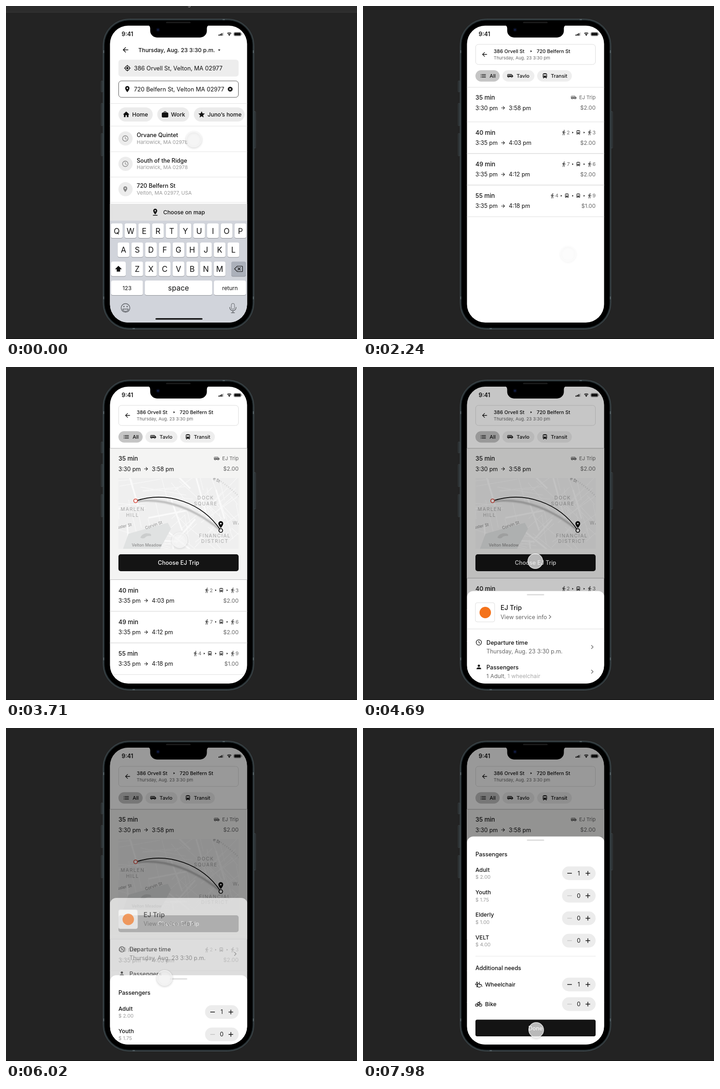
These frames come from a looping animation (768 by 729 pixels, 8000 ms). An HTML page with a canvas:

```html
<!DOCTYPE html>
<html lang="en">
<head>
<meta charset="utf-8">
<title>Trip booking</title>
<style>
html, body { margin: 0; width: 100%; height: 100%; overflow: hidden; background: #232323; }
canvas { display: block; width: 768px; height: 729px; }
</style>
</head>
<body>
<canvas id="stage" width="768" height="729"></canvas>
<script>
const ctx = document.getElementById('stage').getContext('2d');
const LOOP = 8000, INK = '#111', GREY = '#666', PALE = '#999';
const FROM = '386 Orvell St', TO = '720 Belfern St', SERVICE = 'EJ Trip';

const icons = {
  home: 'M10 20v-6h4v6h5v-8h3L12 3 2 12h3v8z',
  pin: 'M12 2C8.1 2 5 5.1 5 9c0 5.3 7 13 7 13s7-7.7 7-13c0-3.9-3.1-7-7-7zm-2.5 7a2.5 2.5 0 1 0 5 0a2.5 2.5 0 1 0-5 0z',
  star: 'M12 17.3L18.2 21l-1.7-7L22 9.2l-7.2-.6L12 2 9.2 8.6 2 9.2 7.5 14 5.8 21z',
  back: 'M20 11H7.8l5.6-5.6L12 4l-8 8 8 8 1.4-1.4L7.8 13H20z',
  next: 'M4 11h12.2l-5.6-5.6L12 4l8 8-8 8-1.4-1.4 5.6-5.6H4z',
  person: 'M8 8a4 4 0 1 0 8 0a4 4 0 1 0-8 0zM12 14c-2.7 0-8 1.3-8 4v2h16v-2c0-2.7-5.3-4-8-4z',
  bag: 'M20 6h-4V4l-2-2h-4L8 4v2H4L2 8v11l2 2h16l2-2V8zM10 4h4v2h-4z',
  bus: 'M4 16l1 2.2V21h3v-2h8v2h3v-2.8l1-2.2V6c0-3.5-3.6-4-8-4s-8 .5-8 4zM6 6h12v5H6zM6 15.5a1.5 1.5 0 1 0 3 0a1.5 1.5 0 1 0-3 0zM15 15.5a1.5 1.5 0 1 0 3 0a1.5 1.5 0 1 0-3 0z',
  van: 'M17 5H3L1 7v9h2a3 3 0 0 0 6 0h5.5a3 3 0 0 0 6 0H23v-5zM3 7h4v4H3zM9 7h4v4H9zM15 7h1l4 4h-5zM4.5 16a1.5 1.5 0 1 0 3 0a1.5 1.5 0 1 0-3 0zM16 16a1.5 1.5 0 1 0 3 0a1.5 1.5 0 1 0-3 0z',
  walk: 'M11.5 3.5a2 2 0 1 0 4 0a2 2 0 1 0-4 0zM9.8 8.9L7 23h2.1l1.8-8 2.1 2v6h2v-7.5l-2.1-2 .6-3C14.8 12 16.8 13 19 13v-2c-1.9 0-3.5-1-4.3-2.4l-1-1.6-1.7-1L6 8.3V13h2V9.6z',
  list: 'M2 6h2v2H2zM2 11h2v2H2zM2 16h2v2H2zM6 6h16v2H6zM6 11h16v2H6zM6 16h16v2H6z',
  shift: 'M12 3L2 13h5v7h10v-7h5z',
  play: 'M7 4l11 8-11 8z',
  drop: 'M5 7l7 8 7-8z'
};
for (const name in icons) icons[name] = new Path2D(icons[name]);

function text(s, x, y, size, weight = 400, color = INK, align = 'left') {
  ctx.font = `${weight} ${size}px Inter, sans-serif`;
  ctx.fillStyle = color;
  ctx.textAlign = align;
  ctx.fillText(s, x, y + size * .36);
}

function box(x, y, w, h, r, fill, line) {
  ctx.beginPath();
  ctx.roundRect(x, y, w, h, r);
  if (fill) { ctx.fillStyle = fill; ctx.fill(); }
  if (line) { ctx.strokeStyle = line; ctx.lineWidth = 1; ctx.stroke(); }
}

function disc(x, y, r, fill, line, width = 1) {
  ctx.beginPath();
  ctx.arc(x, y, r, 0, 7);
  if (fill) { ctx.fillStyle = fill; ctx.fill(); }
  if (line) { ctx.strokeStyle = line; ctx.lineWidth = width; ctx.stroke(); }
}

function stroke(d, color, width) {
  ctx.strokeStyle = color;
  ctx.lineWidth = width;
  ctx.stroke(typeof d === 'string' ? new Path2D(d) : d);
}

function layer(draw, alpha = 1, dx = 0, dy = 0) {
  ctx.save();
  ctx.globalAlpha *= alpha;
  ctx.translate(dx, dy);
  draw();
  ctx.restore();
}

function icon(name, x, y, size, color = INK) {
  layer(() => {
    ctx.scale(size / 24, size / 24);
    ctx.fillStyle = color;
    ctx.fill(icons[name], 'evenodd');
  }, 1, x - size / 2, y - size / 2);
}

const rule = (y, color = '#e3e3e3', x = 227, w = 301) => box(x, y, w, 1, 0, color);
const clamp = v => Math.min(1, Math.max(0, v));
const mix = (a, b, p) => a + (b - a) * p;
const ease = p => p * p * (3 - 2 * p);

// Underdamped spring: stiffness 100, damping 15, mass 1.
function spring(ms) {
  if (ms <= 0) return 0;
  const s = ms / 1000, k = 6.614 * s;
  return 1 - Math.exp(-7.5 * s) * (Math.cos(k) + 1.134 * Math.sin(k));
}

function clock(x, y, r, color) {
  disc(x, y, r, null, color, 1.3);
  stroke(`M${x} ${y - r * .6}V${y}l${r * .5} ${r * .35}`, color, 1.2);
}

function chip(x, y, w, h, name, label, tx, size, fill) {
  box(x, y - h / 2, w, h, h / 2, fill);
  icon(name, x + 17, y, h * .55);
  text(label, tx, y, size, 500);
}

function phone() {
  for (const [x, y, h] of [[208.5, 164, 24], [208.5, 213, 49], [208.5, 279, 49], [543, 231, 80]])
    box(x, y, 3, h, 1, '#202526', '#434b4e');
  box(212.5, 28.5, 330, 679, 57, '#2a3235', '#465257');
  box(215.5, 31.5, 324, 673, 54, '#000', '#11181a');
  for (const y of [97, 636])
    for (const x of [212, 540]) box(x, y, 3, 6, 0, '#4f5a5e');
  for (const y of [28, 705]) box(y < 99 ? 474 : 277, y, 5, 3, 0, '#4f5a5e');
}

function notch() {
  ctx.beginPath();
  ctx.moveTo(310, 42);
  ctx.lineTo(445, 42);
  ctx.quadraticCurveTo(439.500, 43, 439.500, 49);
  ctx.arcTo(439.500, 69, 420, 69, 15);
  ctx.arcTo(315.500, 69, 315.500, 52, 15);
  ctx.lineTo(315.500, 49);
  ctx.quadraticCurveTo(315.500, 43, 310, 42);
  ctx.fillStyle = '#000';
  ctx.fill();
  box(350, 34.5, 54, 3, 1.5, '#1c1c1c');
  disc(332.5, 52, 4, '#080c1d');
  disc(332.5, 52, 1.5, '#17285c');
}

function status() {
  text('9:41', 253, 61, 12.5, 600);
  for (let i = 0; i < 4; i++)
    box(465 + i * 3.1, 62.5 - i * 1.5, 2.2, 2.5 + i * 1.5, .5, i < 3 ? INK : '#ccc');
  for (const r of [6.5, 3.8]) {
    ctx.beginPath();
    ctx.arc(488.5, 65, r, -2.3, -.84);
    ctx.strokeStyle = INK;
    ctx.lineWidth = 1.7;
    ctx.stroke();
  }
  disc(488.5, 63.8, 1.4, INK);
  box(498.5, 57.5, 16, 8, 2.5, null, '#888');
  box(499.5, 58.5, 14, 6, 1.5, INK);
  box(515.5, 60, 1, 3, .5, '#888');
}

function key(x, y, w, label, size = 17, fill = '#fff') {
  box(x, y + 1, w, 32, 4, '#8d9096');
  box(x, y, w, 32, 4, fill);
  if (label) text(label, x + w / 2, y + 16.5, size, 400, INK, 'center');
}

function keyboard() {
  box(227, 433, 301, 37, 0, '#e3e3e3');
  icon('pin', 326.5, 450, 15);
  box(321.5, 457.5, 10, 1.5, 0, INK);
  text('Choose on map', 344, 452, 12.2, 500);
  box(227, 470, 301, 224, 0, '#d1d4db');
  ['QWERTYUIOP', 'ASDFGHJKL', 'ZXCVBNM'].forEach((row, r) =>
    [...row].forEach((c, i) => key([229.5, 244.3, 274.3][r] + 30.07 * i, 476 + 41.7 * r, 25.5, c)));
  key(230, 559.5, 32);
  icon('shift', 246, 575.5, 18);
  key(493, 559.5, 32, '', 0, '#abb0ba');
  stroke('M506 569.5h10.5q1 0 1 1v10q0 1-1 1H506l-6-6zM507 572.5l6 6m0-6l-6 6', INK, 1.2);
  key(230, 601, 69.5, '123', 12);
  key(304, 601, 147, 'space', 16);
  key(455, 601, 70, 'return', 12);
  disc(261.5, 661, 9.5, null, '#5c5f64', 1.4);
  disc(258, 658, 1.4, '#5c5f64');
  disc(265, 658, 1.4, '#5c5f64');
  stroke('M255.5 663.5h12a6 5 0 0 1-12 0z', '#5c5f64', 1.3);
  box(493, 651, 7, 13, 3.5, null, '#5c5f64');
  stroke('M489.5 659v1a7 7 0 0 0 14 0v-1M496.5 667v4.5m-4 0h8', '#5c5f64', 1.3);
}

function searchScreen() {
  box(227, 43, 301, 651, 0, '#fff');
  status();
  icon('back', 261.5, 96, 18);
  text('Thursday, Aug. 23 3:30 p.m.', 289.5, 97, 12.3, 500);
  icon('drop', 466.5, 97, 9);
  box(246, 117.5, 263, 37, 6, '#ededed');
  disc(265.5, 136, 4.8, null, INK, 1.4);
  disc(265.5, 136, 2.4, INK);
  stroke('M265.5 129v3m0 8v3m-7-7h3m8 0h3', INK, 1.4);
  text(FROM + ', Velton, MA 02977', 280, 136, 12.8);
  box(246.5, 164, 262, 36, 6, '#fff', '#555');
  icon('pin', 265.5, 182, 16);
  text(TO + ', Velton MA 02977', 280, 182, 12.8);
  disc(490.5, 182, 5.3, INK);
  stroke('M488.5 180l4 4m0-4l-4 4', '#fff', 1.2);
  rule(213);
  chip(246, 237.5, 75, 31, 'home', 'Home', 276, 12.3, '#ebebeb');
  chip(331, 237.5, 70, 31, 'bag', 'Work', 361, 12.3, '#ebebeb');
  chip(411, 237.5, 111, 31, 'star', 'Juno’s home', 441, 12.3, '#ebebeb');
  rule(262.5);
  [['Orvane Quintet', 'Harlowick, MA 02978'], ['South of the Ridge', 'Harlowick, MA 02978'],
   [TO, 'Velton, MA 02977, USA']].forEach(([name, place], i) => {
    const y = 290 + 55.5 * i;
    disc(261.5, y, 15.5, '#ececec');
    if (i < 2) clock(261, y, 6, '#888');
    else icon('pin', 261, y, 15, '#888');
    text(name, 286, y - 7.5, 12.5, 500);
    text(place, 286, y + 8, 11, 400, PALE);
    rule(y + 28.5);
  });
  keyboard();
  box(327, 683.5, 103, 3, 1.5, '#000');
}

let seed = 11;
const random = () => (seed = seed * 16807 % 2147483647) / 2147483647;
const lanes = new Path2D(), avenues = new Path2D();
for (let i = 0; i < 80; i++) {
  const x = 240 + 270 * random(), y = 240 + 160 * random();
  const tilt = (x < 370 ? [-.3, 1.25, .05] : [.65, -.85, 1.2])[i % 3] + random() * .25;
  const len = 12 + 42 * random(), road = i % 7 ? lanes : avenues;
  road.moveTo(x - len * Math.cos(tilt), y - len * Math.sin(tilt));
  road.lineTo(x + len * Math.cos(tilt), y + len * Math.sin(tilt));
}

function street(s, x, y, tilt) {
  layer(() => { ctx.rotate(tilt); text(s, 0, 0, 9, 400, '#8b8b8b', 'center'); }, 1, x, y);
}

function map() {
  ctx.beginPath();
  ctx.rect(246, 243, 263, 155);
  ctx.clip();
  box(246, 243, 263, 155, 0, '#efefef');
  stroke(lanes, '#f8f8f8', 1.3);
  stroke(avenues, '#fafafa', 3.5);
  ctx.fillStyle = '#e0e2e2';
  ctx.fill(new Path2D('M256 398l12-33 86-24 7 13-24 44z'));
  ctx.fillStyle = '#cbcdcd';
  ctx.fill(new Path2D('M294 373q4-8 13-9 13 0 10 6-10-1-13 4-7 3-10-1z'));
  ctx.setLineDash([2, 3]);
  stroke('M448 239q30 12 65 48', '#dadada', 3.5);
  ctx.setLineDash([]);
  ctx.letterSpacing = '1.5px';
  [['MARLEN', 277, 311], ['HILL', 277, 324], ['DOCK', 437, 286], ['SQUARE', 437, 299],
   ['FINANCIAL', 457, 369], ['DISTRICT', 457, 381], ['WA', 506, 341]]
    .forEach(([s, x, y]) => text(s, x, y, 10.5, 400, '#a6a6a6', 'center'));
  ctx.letterSpacing = '0px';
  street('uster St', 259, 348, -.22);
  street('Corvin St', 323, 346, -.34);
  street('e St', 461, 247, .5);
  text('Velton Meadow', 308, 390, 8.8, 500, '#8b8b8b', 'center');
  layer(() => {
    ctx.filter = 'blur(1.5px)';
    stroke('M286 294C350 286 415 311 470 358', '#b4b4b4', 4);
  });
  stroke('M284 293A163 163 0 0 1 470 358', '#000', 1.7);
  disc(283.5, 293, 4, '#fff', '#d84a3d', 1.7);
  disc(470, 358, 4, '#fff', '#000', 1.7);
  icon('pin', 470, 345, 18, '#000');
}

function trip(y, total, start, end, price) {
  text(total, 246, y, 13.2, 500);
  text(start, 246, y + 22.5, 12.5);
  icon('next', 306.5, y + 22.5, 12);
  text(end, 319, y + 22.5, 12.5);
  text(price, 509, y + 22.5, 12.2, 400, GREY, 'right');
}

// Legs are laid out leftwards from the row's right edge.
function legs(y, first, buses, last) {
  text(last, 509, y, 11, 400, GREY, 'right');
  icon('walk', 496, y, 13, '#444');
  let x = 484;
  for (let i = 0; i < buses; i++, x -= 25) {
    icon('play', x, y, 6);
    icon('bus', x - 13, y, 12, '#444');
  }
  icon('play', x, y, 6);
  text(first, x - 6.5, y, 11, 400, GREY, 'right');
  icon('walk', x - 19.5, y, 13, '#444');
}

function resultsScreen(open) {
  const shift = 208.5 * open, shown = clamp(open);
  box(227, 43, 301, 651, 0, '#fff');
  status();
  box(246.5, 84, 262, 44, 6, '#fff', '#dcdcdc');
  icon('back', 266, 106, 16);
  text(FROM, 286, 99, 10.8, 500);
  icon('play', 368, 99, 7);
  text(TO, 380, 99, 10.8, 500);
  text('Thursday, Aug. 23 3:30 pm', 286, 113.5, 9.6, 400, GREY);
  chip(246, 153, 53, 25, 'list', 'All', 277, 11, '#c5c5c5');
  chip(305, 153, 70, 25, 'van', 'Tavlo', 336, 11, '#eee');
  chip(381, 153, 76, 25, 'bus', 'Transit', 411, 11, '#eee');
  layer(() => box(227, 178, 301, 75.5 + shift, 0, '#f4f4f3'), shown);
  layer(() => {
    ctx.beginPath();
    ctx.rect(227, 178, 301, 75.5 + shift);
    ctx.clip();
    layer(map);
    box(246, 410, 263, 37, 5, '#141414');
    text('Choose ' + SERVICE, 377.5, 428.5, 12.5, 500, '#fff', 'center');
  }, shown);
  rule(177.5, '#dedede');
  trip(200.5, '35 min', '3:30 pm', '3:58 pm', '$2.00');
  text(SERVICE, 509, 200.5, 11, 400, GREY, 'right');
  icon('van', 461, 200.5, 13, '#555');
  [['40 min', '4:03 pm', '$2.00', 2, 1, 3], ['49 min', '4:12 pm', '$2.00', 7, 1, 6],
   ['55 min', '4:18 pm', '$1.00', 4, 2, 9]].forEach(([total, end, price, a, buses, b], i) => {
    const y = 277 + 69.2 * i + shift;
    trip(y, total, '3:35 pm', end, price);
    legs(y, a, buses, b);
    rule(y - 23.8, '#dedede');
    rule(y + 45.4, '#dedede');
  });
  layer(() => { rule(177.5, '#bdbdbd'); rule(253.2 + shift, '#bdbdbd'); }, shown);
}

function sheet(top, alpha, draw) {
  layer(() => {
    box(0, 0, 301, 720, [14, 14, 0, 0], '#fff');
    box(131, 6.5, 38, 3, 1.5, '#dedede');
    draw();
  }, alpha, 227.5, top);
}

function serviceSheet() {
  const arrow = (x, y, h) => stroke(`M${x} ${y - h}l${h} ${h}l${-h} ${h}`, GREY, 1.3);
  box(18.5, 25.5, 42, 42, 4, '#fff', '#ddd');
  disc(40, 47, 12.5, '#f4731c');
  text(SERVICE, 73.5, 36.5, 14, 500);
  text('View service info', 73.5, 56.5, 12.5, 400, GREY);
  arrow(179.5, 56.5, 4);
  rule(82.5, '#dedede', 0);
  clock(26, 112.5, 5.8, INK);
  text('Departure time', 42.5, 112.5, 12.7, 500);
  text('Thursday, Aug. 23 3:30 p.m.', 42.5, 132, 12.4, 400, GREY);
  arrow(272, 122.5, 4);
  icon('person', 26, 166, 15);
  text('Passengers', 42.5, 166.5, 12.6, 500);
  text('1 Adult', 42.5, 186, 12.3, 400, GREY);
  text(', 1 wheelchair', 42.5 + ctx.measureText('1 Adult').width, 186, 12.3, 400, '#aaa');
  arrow(272, 176.5, 4);
}

function stepper(y, count) {
  box(208, y - 15, 73.5, 30, 15, '#ececec');
  stroke(`M219.5 ${y}h10`, count ? INK : '#c4c4c4', 1.5);
  text(count, 244.5, y, 12.5, 400, INK, 'center');
  stroke(`M259.5 ${y}h10m-5-5v10`, INK, 1.5);
}

function passengerSheet() {
  text('Passengers', 18.5, 38.5, 12.5, 500);
  [['Adult', '2.00', 1], ['Youth', '1.75', 0], ['Elderly', '1.00', 0], ['VELT', '4.00', 0]]
    .forEach(([name, price, count], i) => {
      const y = 80.5 + 49.2 * i;
      text(name, 18.5, y - 7.5, 12.3, 500);
      text('$ ' + price, 18.5, y + 8.5, 10.8, 400, PALE);
      stepper(y, count);
    });
  rule(261.5, '#e6e6e6', 18.5, 263);
  text('Additional needs', 18.5, 288, 12.5, 500);
  disc(22, 319.5, 1.5, INK);
  stroke('M22 321v5m-3-4v3m3 1v4', INK, 1.8);
  stroke('M27 318v6h4l2 5M27 322a4 4 0 1 0 3 6', INK, 1.3);
  text('Wheelchair', 39.5, 324, 12.3, 500);
  disc(21.5, 369, 3, null, INK, 1.2);
  disc(29.5, 369, 3, null, INK, 1.2);
  stroke('M21.5 369l3-5h4l-3 5zM27 361.5l2.5 7.5M23 363h3M27 361.5h2', INK, 1.2);
  text('Bike', 39.5, 367, 12.3, 500);
  stepper(324, 1);
  stepper(367, 0);
  box(18.5, 401, 263, 36.5, 4, '#141414');
  text('Done', 150, 419.5, 12.5, 500, '#fff', 'center');
}

// Time, x, y, lift.
const cursorPath = [
  [0, 411, 292, .9], [650, 480, 618, .5], [1100, 480, 618, 0], [1950, 480, 618, 0],
  [2730, 381, 377, 1], [3200, 381, 377, 1], [3710, 380, 379, .6], [4300, 377, 425, 1],
  [4800, 377, 425, 1], [5740, 347, 547, 1], [7560, 347, 547, 1], [7970, 379, 661, 1], [LOOP, 379, 661, 1]
];

function cursor(t) {
  const i = cursorPath.findIndex(k => k[0] > t);
  const a = cursorPath[i - 1], b = cursorPath[i];
  const p = ease((t - a[0]) / (b[0] - a[0]));
  const [, x, y, lift] = a.map((v, j) => mix(v, b[j], p));
  const shade = 255 - 15 * lift;
  layer(() => {
    ctx.shadowColor = `rgba(0,0,0,${.5 * lift})`;
    ctx.shadowBlur = 4;
    ctx.shadowOffsetY = 1.5;
    disc(x, y, 16.3, null, `rgba(255,255,255,${.6 + .2 * lift})`, 1.4);
  });
  disc(x, y, 16.3, `rgba(${shade},${shade},${shade},${.55 + .2 * lift})`);
}

function topBar(t) {
  layer(() => {
    box(0, 0, 768, 13, 0, '#2c2c2c');
    box(0, 13, 768, 1.5, 0, '#343434');
    text('g', 401, -4.5, 12, 400, '#aaa', 'center');
  }, 1 - clamp((t - 1400) / 180));
}

function render(t) {
  box(0, 0, 768, 729, 0, '#232323');
  topBar(t);
  box(0, 728, 768, 1, 0, '#0e0e0e');
  phone();

  const results = ease(clamp((t - 1780) / 420));
  const service = spring(t - 4511), passengers = spring(t - 5913);
  layer(() => {
    ctx.beginPath();
    ctx.roundRect(227.5, 43, 300, 650, 40);
    ctx.clip();
    if (results < 1) searchScreen();
    if (results > 0) layer(() => resultsScreen(spring(t - 3105)), results);
    if (service > 0) {
      box(227, 43, 301, 651, 0, `rgba(0,0,0,${.4 * clamp(service) ** 1.25})`);
      sheet(mix(693, 372, service), 1 - clamp(passengers), serviceSheet);
    }
    if (passengers > 0) sheet(mix(693, 237.5, passengers), 1, passengerSheet);
    cursor(t);
  });
  notch();
}

const began = performance.now();
function tick() {
  render((performance.now() - began) % LOOP);
  requestAnimationFrame(tick);
}
tick();
</script>
</body>
</html>
```
